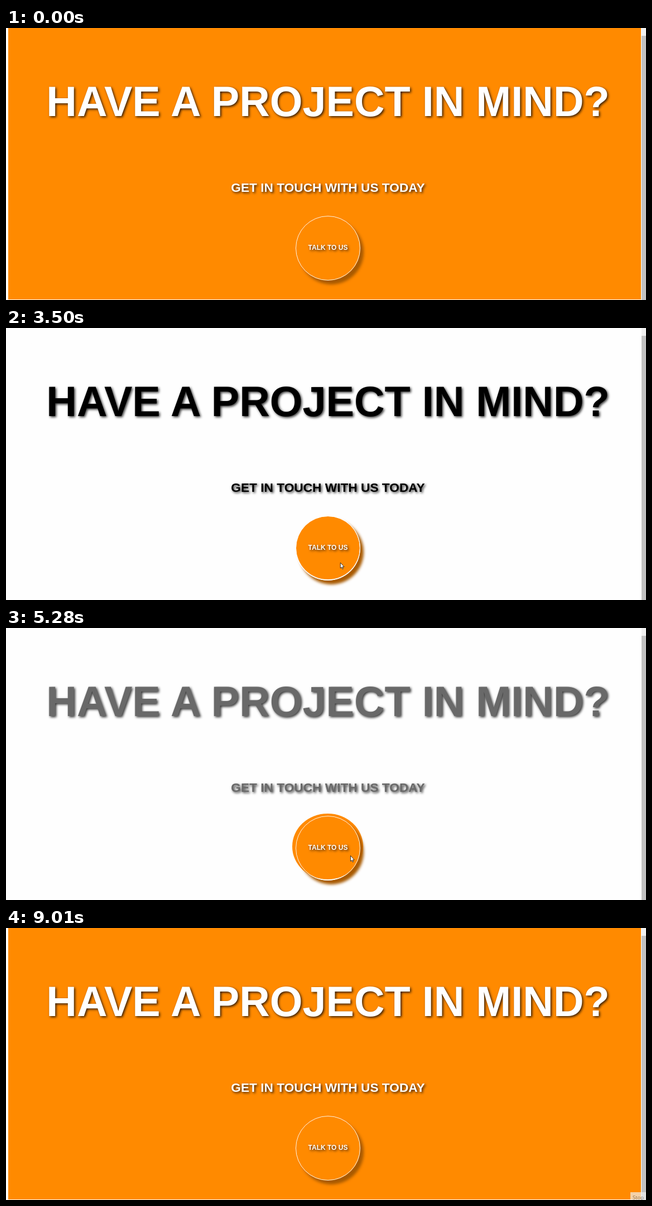
Recreate the animation shown at these times as an HTML page. Size 1147 by 488 pixels, loop 9070 ms.

```html
<!DOCTYPE html>
<html lang="en">
<head>
<meta charset="utf-8">
<title>Contact panel</title>
<style>
  html, body { margin: 0; width: 100%; height: 100%; overflow: hidden; background: #fefefe; }
  body { position: relative; font: bold 12px Arial, "Liberation Sans", sans-serif; }
  body * { position: absolute; }
  #page { left: 0; top: 0; width: 1138px; height: 488px; overflow: hidden; }
  #panel { background: #ff8a00; }
  .line {
    left: 0; width: 1154px; text-align: center; line-height: 0; white-space: nowrap; color: #fff;
    text-rendering: optimizeLegibility; text-shadow: 2px 2px 4px rgba(0, 0, 0, .8);
  }
  #title { top: 132px; font-size: 75.6px; }
  #sub { top: 286px; font-size: 22.7px; }
  #label { top: 394px; }
  #button {
    left: 519px; top: 337px; width: 114px; height: 114px; border: 1px solid rgba(255, 255, 255, .9);
    border-radius: 50%; box-shadow: 6px 7px 5px #a85a00;
  }
  #bar { left: 1139px; top: 0; width: 8px; height: 488px; background: #f1f1f1; }
  #thumb { left: 0; top: 14px; width: 8px; height: 474px; background: #c1c1c1; }
  #tip {
    left: 1119px; top: 474px; width: 28px; height: 14px; overflow: hidden; background: #f0f0f0;
    font: 9.5px/20px "Open Sans", sans-serif; color: #666; text-align: center;
  }
  #cursor { left: 0; top: 0; overflow: visible; }
</style>
</head>
<body>
<div id="page">
  <div id="panel"></div>
  <div id="button"></div>
  <div id="title" class="line">HAVE A PROJECT IN MIND?</div>
  <div id="sub" class="line">GET IN TOUCH WITH US TODAY</div>
  <div id="label" class="line">TALK TO US</div>
  <svg id="cursor" width="8" height="13">
    <path d="M.5 .5V10.5L2.7 8.5 4.2 12 5.7 11.3 4.2 8H7.3Z" fill="#fff" stroke="#111" stroke-width=".8"/>
  </svg>
</div>
<div id="bar"><div id="thumb"></div></div>
<div id="tip">Stop</div>
<script>
const LOOP = 9070, GLIDE = 400;
const $ = id => document.getElementById(id);
const mix = (a, b, k) => a + (b - a) * k;

// The panel closes while the pointer is over the button
const hovers = [{ enter: 1430, leave: 3507 }, { enter: 4430, leave: 7062 }];

// Where the pointer heads from each moment on; it starts and ends out of view
const moves = [
  { at: 0, x: 1140, y: 472 }, { at: 430, x: 600, y: 500 }, { at: 1400, x: 594, y: 421 },
  { at: 3480, x: 685, y: 411 }, { at: 4220, x: 617, y: 408 }, { at: 7000, x: 700, y: 500 }
];

// CSS ease-in-out: cubic-bezier(.42, 0, .58, 1), solved by bisection
function easeInOut(x) {
  if (x <= 0) return 0;
  if (x >= 1) return 1;
  let lo = 0, hi = 1, u;
  for (let i = 0; i < 24; i++) {
    u = (lo + hi) / 2;
    const v = 1 - u;
    if (1.26 * u * v * v + 1.74 * u * u * v + u * u * u < x) lo = u; else hi = u;
  }
  return u * u * (3 - 2 * u);
}

function drawPanel(t) {
  const hover = hovers.findLast(h => h.enter <= t);
  const opens = !hover || t >= hover.leave;
  const age = !hover ? LOOP : opens ? t - hover.leave : t - hover.enter - 300;
  const level = ms => opens ? easeInOut(age / ms) : 1 - easeInOut(age / ms);

  const size = level(600);
  const left = mix(520, 3.5, size), right = mix(633.5, 1150, size);
  const top = mix(338, -46, size), bottom = mix(451, 487, size);
  Object.assign($("panel").style, {
    left: left + "px", top: top + "px",
    width: right - left + "px", height: bottom - top + "px",
    borderRadius: opens ? 80 * (1 - size) + "px" : 100 * (1 - size) + "%"
  });

  const grey = Math.round(255 * level(1000));
  $("title").style.color = $("sub").style.color = `rgb(${grey}, ${grey}, ${grey})`;
}

function drawCursor(t) {
  const i = moves.findLastIndex(m => m.at <= t);
  const to = moves[i], from = moves[i - 1] || to;
  const k = Math.min(1, (t - to.at) / GLIDE);
  $("cursor").style.transform = `translate(${mix(from.x, to.x, k)}px, ${mix(from.y, to.y, k)}px)`;
}

function frame() {
  const t = performance.now() % LOOP;
  drawPanel(t);
  drawCursor(t);
  $("tip").style.opacity = t < 8920 ? 0 : .7;
  requestAnimationFrame(frame);
}
frame();
</script>
</body>
</html>
```
